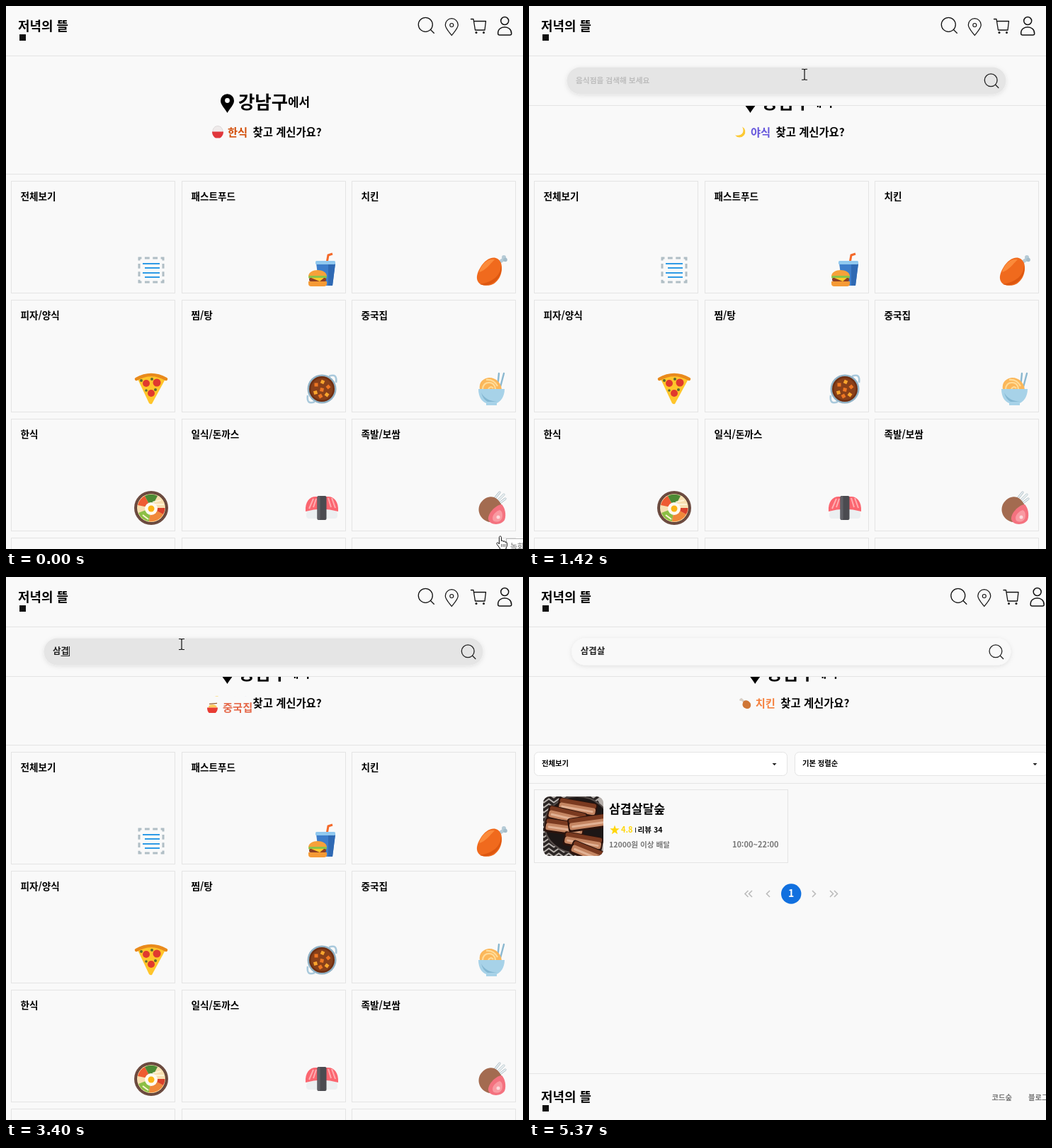
Recreate the animation shown at these times as an HTML page. Size 730 by 767 pixels, loop 5430 ms.

```html
<!DOCTYPE html>
<html lang="ko">
<head>
<meta charset="utf-8">
<title>음식점 검색</title>
<style>
  html, body { margin: 0; width: 100%; height: 100%; overflow: hidden; background: #f9f9f9; }
  svg { display: block; width: 730px; height: 767px; }
  text { font-family: "Noto Sans CJK KR", "Noto Sans KR", "Noto Sans CJK", sans-serif; font-weight: 700; white-space: pre; }
</style>
</head>
<body>
<svg id="stage" viewBox="0 0 730 767" fill="none"></svg>
<script>
const LOOP = 5430;
const LINE = '#e4e4e4', BG = '#f9f9f9';

// Markup helpers
const text = (x, y, size, str, fill = '#000', more = '') =>
  `<text x="${x}" y="${y}" font-size="${size}" fill="${fill}" ${more}>${str}</text>`;
const rect = (x, y, w, h, fill, more = '') =>
  `<rect x="${x}" y="${y}" width="${w}" height="${h}" fill="${fill}" ${more}/>`;
const dot = (x, y, r, fill, more = '') => `<circle cx="${x}" cy="${y}" r="${r}" fill="${fill}" ${more}/>`;
const path = (d, fill = 'none', stroke = 'none', width = 1, more = '') =>
  `<path d="${d}" fill="${fill}" stroke="${stroke}" stroke-width="${width}" ${more}/>`;
const group = (id, body, more = '') => `<g id="${id}" ${more}>${body}</g>`;
const at = (x, y, body, turn = 0) => `<g transform="translate(${x} ${y}) rotate(${turn})">${body}</g>`;
const rule = y => rect(0, y, 730, 1, LINE);
const ROUND = 'stroke-linecap="round" stroke-linejoin="round"';

// Food pictures, each drawn around its own centre
const foods = {
  all: rect(-17, -17, 34, 34, 'none', 'stroke="#b0bec5" stroke-width="3" stroke-dasharray="6.8 4.53" stroke-dashoffset="3.4"') +
    path('M-12-9H12M-9-3H12M-12 4H12M-9 10H12', 'none', '#2f9be6', 2),
  fast: path('M7-10L9-21 15-23', 'none', '#f4692a', 3) +
    path('M-8-10H19L15 22H-4Z', '#3d7dca') + path('M9-9H19L15 22H9Z', '#2f69b3') +
    rect(-9, -13, 28, 5, '#90c8ef', 'rx="1.5"') +
    path('M-19 9C-19-3 7-3 7 9Z', '#f6a13a') + rect(-19, 8, 26, 4, '#8bc34a', 'rx="2"') +
    rect(-18, 11, 24, 5, '#8d3f24', 'rx="2"') + path('M-15 11H3L-3 16Z', '#ffca28') +
    path('M-19 16H7V19Q7 23 3 23H-15Q-19 23-19 19Z', '#f59a35'),
  chicken: path('M9-10L18-16', 'none', '#b6cbd6', 5, ROUND) + dot(17, -18, 3, '#b6cbd6') + dot(19, -14.5, 2.8, '#a5bdca') +
    path('M13-10C7-23-8-18-16-4C-28 15-17 25-1 21C9 18 17 4 13-10Z', '#f06a1d') +
    path('M-18 3C-15-9-5-17 4-15C-3-8-8 0-18 3Z', '#fb8a3a') +
    path('M13-7C13 7 2 17-17 20C-1 26 17 10 13-7Z', '#dd5710'),
  pizza: path('M-19-14Q0-23 20-14L1 21Q-1 22-3 20Z', '#ffc52b') +
    path('M-21-14Q0-26 21-14', 'none', '#e98a1c', 4.5, ROUND) +
    dot(-7, -8, 5, '#e0392f') + dot(8, -9, 5.5, '#e0392f') + dot(0, 6, 5, '#e0392f') +
    dot(-14, -12, 2, '#5d6b2e') + dot(1, -14, 2, '#5d6b2e') + dot(6, 1, 2, '#5d6b2e') + dot(-7, 2, 1.8, '#5d6b2e'),
  stew: path('M10-18Q22-23 20-9M-10 18Q-22 23-20 9', 'none', '#a9c9dc', 2.6) +
    dot(0, 0, 20.5, '#90b2c6') + dot(0, 0, 18, '#6f2f12') + dot(0, 0, 15.5, '#89401a') +
    [[-8, -6], [1, -10], [9, -3], [-9, 5], [0, 1], [7, 8], [-2, 10]].map(([x, y], i) =>
      at(x, y, rect(-2.5, -2.5, 5, 5, i % 2 ? '#f9a52d' : '#ee7623'), i * 25)).join(''),
  noodle: path('M8-3L10-22M12-3L17-22', 'none', '#8bb8d0', 2.4, ROUND) +
    path('M-17 1C-19-10-12-15-4-16C7-16 13-8 14 1Z', '#fbb75a') +
    path('M-13 0Q-12-9-4-9T5 0M-8-13Q3-14 8-4M-5 0Q-2-5 2-1', 'none', '#ffdc98', 2.2) +
    path('M-19 0H18C18 11 12 18 7 20V23H-8V20C-14 18-19 11-19 0Z', '#a7d2e8') +
    path('M-15 5Q-13 14-6 18H8Q-9 17-15 5Z', '#83b7d2'),
  bibimbap: dot(0, 0, 24, '#6d4c41') + dot(0, 0, 21, '#5a3a2e') + dot(0, 0, 20, '#f7dfb0') +
    path('M0 0L-19-4A19.5 19.5 0 0 1-9-17Z', '#ee5b32') + path('M0 0L-9-17A19.5 19.5 0 0 1 9-17Z', '#4d8a34') +
    path('M0 0L-18 7A19.5 19.5 0 0 0-3 19Z', '#8cbf45') + path('M0 0L-3 19A19.5 19.5 0 0 0 17 9Z', '#f0883a') +
    path('M0 0L17 9A19.5 19.5 0 0 0 19.5 0Z', '#d9412b') + path('M2-8L14-11M4-5L18-5M-12 10L-4 16', 'none', '#fff3d5', 2) +
    dot(0, 1, 9, '#fffaf0') + dot(0, 1, 4.5, '#fcb515'),
  sushi: path('M-20 2H20Q25 15 18 15H-18Q-25 15-20 2Z', '#eceff1') +
    path('M-23 5C-24-9-17-16-9-16H9C17-16 24-9 23 5Q0-2-23 5Z', '#fb6670') +
    path('M-18 1L-12-13M14-14L19 0M-12-1L-8-13M9-14L13-1', 'none', '#ffadb0', 2) +
    rect(-6.5, -17, 13, 34, '#4b4b50', 'rx="2"') + rect(-6.5, -17, 4, 34, '#606066', 'rx="2"'),
  pork: path('M2-11L11-22M7-9L17-19M10-6L19-13', 'none', '#9fb1ba', 3, ROUND) +
    path('M2-11L11-22M7-9L17-19M10-6L19-13', 'none', '#eef3f5', 1.8, ROUND) +
    path('M12-7C5-20-10-18-17-5C-23 9-10 22 2 20C14 16 19 2 12-7Z', '#a36b50') +
    path('M14-5C5-4-6 8-5 16C-3 25 13 25 18 17C21 9 18-1 14-5Z', '#f4727f') +
    path('M11 3C3 6-1 13 2 18C8 22 15 18 15 11Q15 4 11 3Z', '#f99aa2') + dot(9, 13, 2.5, '#fdd9dc'),
};

const smallFoods = {
  rice: path('M-7 0C-8-12 8-12 7 0Z', '#efebeb', '#cfcaca', .6) + path('M-8-1H8C8 4 5 7 3 8H-3C-5 7-8 4-8-1Z', '#e0373c'),
  moon: path('M2-8A8 8 0 1 1-8 4C2 6 6-1 2-8Z', '#fcc934'),
  bowl: path('M-6-1C-7-6 5-7 6-1Z', '#ffcb5c') + path('M-5-6L6-7', 'none', '#9a5b2c', 1.3) +
    path('M-8-1H7C7 4 4 6 3 8H-4C-6 6-8 4-8-1Z', '#e83c34'),
  leg: path('M-2-2L-6-6', 'none', '#d8cfc4', 3, ROUND) + dot(-7, -5, 1.6, '#d8cfc4') +
    path('M-4 0C-3-6 4-5 7 0C9 6 4 9 0 7C-3 6-5 3-4 0Z', '#cf7636'),
};

const slide = (i, name, pic, width, color) =>
  at(316 - width / 2, 24 * i, at(8, 178.5, smallFoods[pic]) + text(22, 183.6, 15.3, name, color));

const search = (x, y, r) =>
  dot(x, y, r, 'none') + path(`M${x + r * .72} ${y + r * .72}L${x + r * 1.2} ${y + r * 1.2}`, 'none', 'inherit', 1.3, ROUND)
    .replace(' stroke="inherit"', '');

const brand = y => rect(19, y + 40, 9, 9, '#111') + text(17, y + 34.5, 17.9, '저녁의 뜰', '#000', 'font-weight="900"');

const header = rect(0, 0, 730, 70, BG) + rule(70) + brand(0) +
  group('icons',
    group('find', search(592.3, 26.3, 10), 'stroke="#111" stroke-width="1.3"') +
    path('M629.3 41.5C625 36 620.3 31 620.3 26.7A9 9 0 0 1 638.3 26.7C638.3 31 633.6 36 629.3 41.5Z', 'none', '#111', 1.2) +
    dot(629.3, 27, 2.5, 'none', 'stroke="#111" stroke-width="1.1"') +
    path('M656.5 18.5H660L662.5 34H676L677.5 21.5H661', 'none', '#111', 1.3, ROUND) +
    dot(664, 37.5, 1.5, '#111') + dot(674.5, 37.5, 1.5, '#111') +
    dot(704.2, 21, 5.5, 'none', 'stroke="#111" stroke-width="1.5"') +
    path('M694.7 39C694 26.5 714 26.5 713.7 39Q713.7 41 711.5 41H697Q694.7 41 694.7 39Z', 'none', '#111', 1.5));

const hero = path('M312.5 151C309 144.5 303 139.5 303 133.7A9.5 9.5 0 0 1 322 133.7C322 139.5 316 144.5 312.5 151Z', '#000') +
  dot(312.5, 133.5, 3.4, BG) +
  text(328, 144.5, 25.4, '강남구') + text(398, 141.5, 16.9, '에서') +
  `<g clip-path="url(#slot)">` +
  group('reel', slide(0, '한식', 'rice', 50, '#d3500c') + slide(1, '야식', 'moon', 50, '#6657dc') + slide(2, '중국집', 'bowl', 64, '#e5694a')) +
  group('firstSlide', slide(0, '치킨', 'leg', 50, '#f5813f')) + '</g>' +
  text(348.5, 183.6, 15.4, '찾고 계신가요?');

const labels = ['전체보기', '패스트푸드', '치킨', '피자/양식', '찜/탕', '중국집', '한식', '일식/돈까스', '족발/보쌈'];
const pics = Object.values(foods);
const home = Array.from({ length: 12 }, (_, i) => {
  const x = Math.round(7 + (i % 3) * 240.5), y = 248 + Math.floor(i / 3) * 168;
  return rect(x + .5, y - .5, 231, 158, 'none', `stroke="${LINE}"`) +
    (labels[i] ? text(x + 13.5, y + 26.3, 13.6, labels[i]) + at(x + 198, y + 125, pics[i]) : '');
}).join('');

const select = (x, label) =>
  rect(x + .5, 247.5, 357, 33, '#fff', `rx="6" stroke="${LINE}"`) +
  text(x + 11, 267, 10.3, label) + path(`M${x + 336.5} 263h6l-3 3.3z`, '#222');
const chevron = (x, dir) => path(`M${x - dir * 2} 443l${dir * 4.5} 4.5l${-dir * 4.5} 4.5`, 'none', '#bbb', 1.6);
const star = Array.from({ length: 10 }, (_, i) => {
  const r = i % 2 ? 2.9 : 7, a = Math.PI * (i / 5 - .5);
  return `${121 + r * Math.cos(a)},${357.5 + r * Math.sin(a)}`;
}).join(' ');

const slice = (x, y, turn) => at(x, y,
  rect(-2, -3, 56, 20, '#2c130c', 'rx="4"') + rect(0, -2, 52, 7, '#7a3a20', 'rx="3"') +
  rect(0, 4, 52, 10, '#c58663', 'rx="3"') + rect(3, 8, 46, 3, '#e2b295', 'rx="1.5"'), turn);
const photo = rect(20, 310, 85, 84, '#b5afab') +
  Array.from({ length: 14 }, (_, i) =>
    path(`M14 ${310 + i * 7}l7 5 7-5 7 5 7-5 7 5 7-5 7 5 7-5 7 5 7-5 7 5 7-5`, 'none', '#2a2524', 3.5)).join('') +
  '<ellipse cx="68" cy="350" rx="46" ry="40" fill="#1d1716" stroke="#544b48" stroke-width="2"/>' +
  slice(44, 314, 10) + slice(30, 325, 13) + slice(25, 343, 8) + slice(56, 344, -8) + slice(52, 362, 10) + slice(64, 374, 22);

const results = select(7, '전체보기') + select(375, '기본 정렬순') + rule(291) +
  rect(7.5, 300.5, 358, 103, 'none', `stroke="${LINE}"`) +
  group('photo', photo, 'clip-path="url(#thumb)"') +
  text(113, 334, 17.2, '삼겹살달숲') +
  `<polygon points="${star}" fill="#ffd60a"/>` +
  text(130, 361, 11, '4.8', '#ffd60a') + rect(150, 354, 1, 7, '#222') + text(153.5, 361, 10.6, '리뷰 34') +
  text(113, 382.3, 10.6, '12000원 이상 배달', '#777') +
  text(352.5, 382.3, 11, '10:00~22:00', '#777', 'text-anchor="end"') +
  chevron(307.5, -1) + chevron(313, -1) + chevron(338, -1) + chevron(402, 1) + chevron(427, 1) + chevron(433, 1) +
  dot(370.2, 447.5, 14.2, '#1170df') + text(370.2, 452.2, 14, '1', '#fff', 'text-anchor="middle"') +
  rule(701) + brand(706) + text(653.5, 738.5, 10.3, '코드숲', '#777') + text(705, 738.5, 10.3, '블로그', '#777');

const panel = rect(0, 70, 730, 71, BG) +
  group('panelBody',
    rect(53.5, 86.5, 620, 38, BG, 'id="pill" rx="19" filter="url(#soft)"') +
    text(66, 108.6, 10.7, '음식점을 검색해 보세요', '#bdbdbd', 'id="hint"') +
    text(66, 108.6, 12.5, '', '#222', 'id="query"') +
    rect(0, 111, 11.5, 1, '#222', 'id="underline"') + rect(0, 98, 1, 14, '#222', 'id="caret"') +
    `<g stroke="#222" stroke-width="1.3">${search(652.2, 104.8, 8.9)}</g>`);

const cursors =
  group('arrow', path('M0 0V14.2L3.3 11.2 5.6 16.6 8 15.6 5.7 10.3H10Z', '#fff', '#111', .9)) +
  group('hand',
    path('M-1.6 1.5C-1.6-.6 1.4-.6 1.4 1.5V6.6Q4 5 4 7.6Q6.8 5.8 6.8 8.4Q9.4 7.2 9.4 10V13Q9.4 15 8 16.5V18.5H-.6V17L-4.6 11.6C-6.2 9.4-3.8 8.2-2.6 9.6L-1.6 11Z', '#fff', '#111', 1) +
    path('M1.8 11V15M4.2 11V15M6.6 11V15', 'none', '#333', .8)) +
  group('beam', path('M-4-7.5H-1L0-6.5 1-7.5H4M0-6.5V6.5M-4 7.5H-1L0 6.5 1 7.5H4', 'none', '#111', 1.2));

const stage = document.getElementById('stage');
stage.innerHTML = `<defs>
  <clipPath id="slot"><rect x="270" y="168" width="78.5" height="24"/></clipPath>
  <clipPath id="thumb"><rect x="20" y="310" width="85" height="84" rx="9"/></clipPath>
  <clipPath id="drawer"><rect id="drawerBox" x="-20" y="70" width="770"/></clipPath>
  <filter id="soft" x="-5%" y="-50%" width="110%" height="200%"><feDropShadow dx="0" dy="1.5" stdDeviation="3" flood-opacity=".1"/></filter>
  </defs>` + rect(0, 0, 730, 767, BG) +
  group('hero', hero) + rule(237) + group('home', home) + group('results', results) +
  `<g clip-path="url(#drawer)">${group('panel', panel)}</g>` + rect(0, 0, 730, 1, LINE, 'id="panelEdge"') + header +
  group('tip', rect(706.5, 752.5, 40, 30, '#fff', 'stroke="#bbb"') + text(712, 767.5, 11, '녹화', '#999')) +
  group('cursor', cursors);

const el = Object.fromEntries([...stage.querySelectorAll('[id]')].map(node => [node.id, node]));
const show = (node, on) => node.setAttribute('display', on ? 'inline' : 'none');
const move = (node, x, y) => node.setAttribute('transform', `translate(${x} ${y})`);
const clamp = v => Math.min(1, Math.max(0, v));

// cubic-bezier(.25, .1, .25, 1)
function ease(p) {
  p = clamp(p);
  if (p === 0 || p === 1) return p;
  let lo = 0, hi = 1, u;
  const curve = (a, b) => 3 * (1 - u) ** 2 * u * a + 3 * (1 - u) * u * u * b + u ** 3;
  for (let i = 0; i < 24; i++) {
    u = (lo + hi) / 2;
    if (curve(.25, .25) < p) lo = u; else hi = u;
  }
  return curve(.1, 1);
}

const pointer = [[0, 698, 749], [60, 698, 749], [200, 655, 450], [330, 611, 183], [600, 598, 70], [800, 583, 34],
  [1010, 579, 29], [1110, 576, 36], [1210, 520, 88], [1500, 340, 100], [1770, 248, 95], [4390, 248, 95],
  [4530, 330, 170], [4700, 560, 480], [4850, 706, 720]];
function pointerAt(t) {
  const i = pointer.findIndex(k => k[0] > t);
  if (i < 0) return pointer[pointer.length - 1].slice(1);
  const [a, b] = [pointer[i - 1], pointer[i]], p = (t - a[0]) / (b[0] - a[0]);
  return [1, 2].map(n => a[n] + (b[n] - a[n]) * p);
}

const typing = [[2430, 'ㅅ'], [2495, '사'], [2675, '삼'], [3045, '삼ㄱ'], [3200, '삼겨'], [3330, '삼겹'],
  [3595, '삼겹ㅅ'], [3660, '삼겹사'], [3725, '삼겹살']];
const blinkOff = [[0, 1765], [2235, 2430], [4430, 4965], [5365, LOOP]];
const FOUND = 3925;

function draw(t) {
  const found = t >= FOUND, shift = found ? 6.75 : 0;
  show(el.home, !found);
  show(el.results, found);
  show(el.photo, t >= 3995);
  show(el.reel, !found);
  show(el.firstSlide, found);
  show(el.tip, t < 65);
  move(el.hero, shift, 0);
  move(el.icons, shift * 2, 0);
  move(el.reel, 0, -24 * (ease((t - 400) / 500) + ease((t - 3190) / 500)));

  const open = 70 * ease((t - 965) / 300);
  el.drawerBox.setAttribute('height', open);
  move(el.panelBody, shift, (open - 70) / 2);
  el.panelEdge.setAttribute('y', 70 + Math.round(open));

  const grey = 249 - 20 * (ease((t - 1220) / 200) - ease((t - 4450) / 200));
  el.pill.setAttribute('fill', `rgb(${grey},${grey},${grey})`);

  const query = typing.filter(k => k[0] <= t).map(k => k[1]).pop() || '';
  if (el.query.textContent !== query) el.query.textContent = query;
  const width = query ? el.query.getComputedTextLength() : 0;
  show(el.hint, !query);
  show(el.underline, query && !found);
  el.underline.setAttribute('x', 66 + width - 11.5);
  show(el.caret, !blinkOff.some(([a, b]) => t >= a && t < b));
  el.caret.setAttribute('x', Math.round(66 + width));

  const [x, y] = pointerAt(t);
  const beam = t > 1200 && y > 86 && y < 125 && x < 640;
  const hand = !found && (y > 248 || (y < 45 && x < 606));
  show(el.cursor, t < 4890);
  show(el.beam, beam);
  show(el.hand, hand);
  show(el.arrow, !beam && !hand);
  move(el.cursor, x, y);
  el.find.setAttribute('stroke', hand && y < 45 ? '#1a6fe0' : '#111');
}

const start = performance.now();
function tick() {
  draw((performance.now() - start) % LOOP);
  requestAnimationFrame(tick);
}
tick();
</script>
</body>
</html>
```
